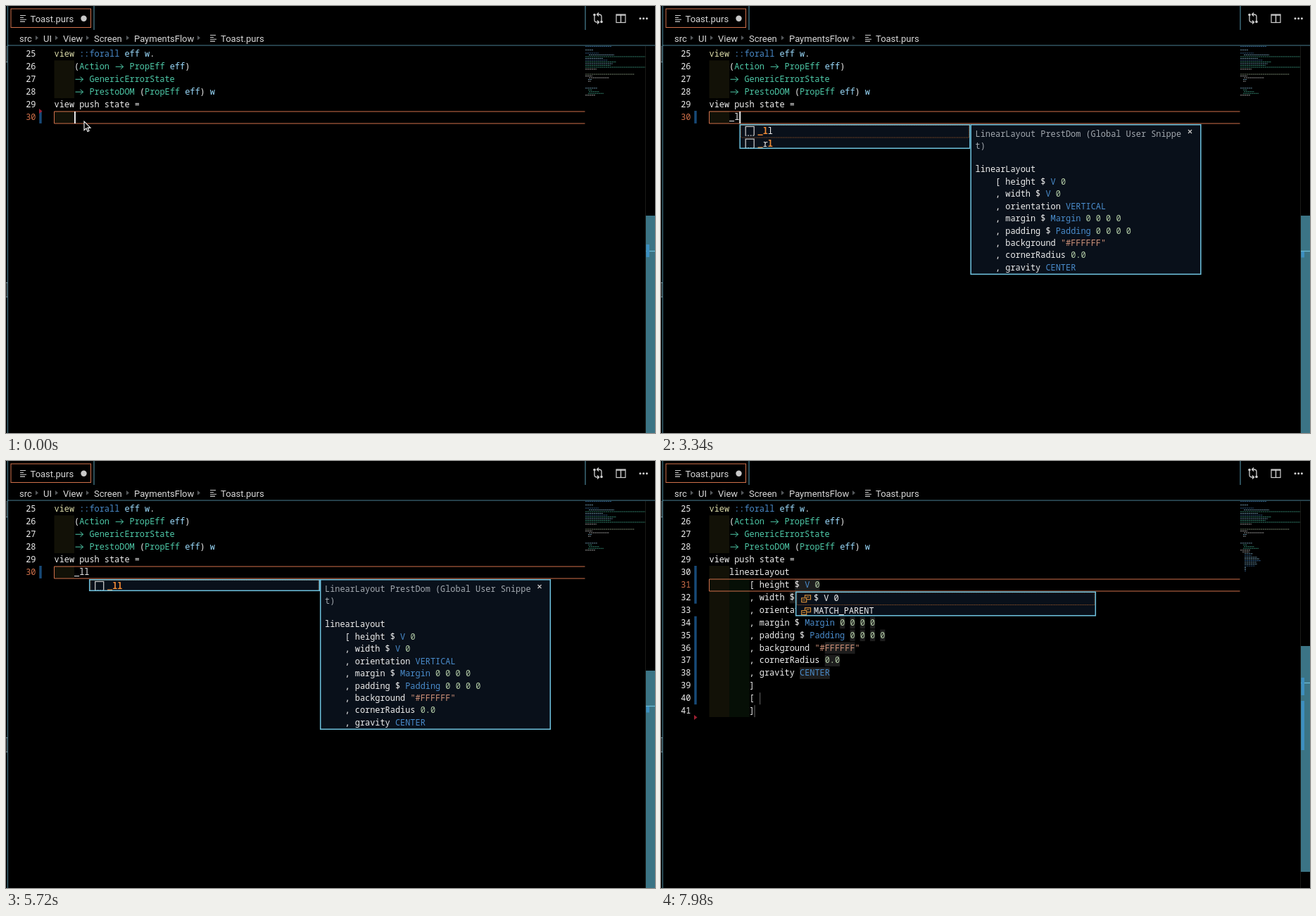
These frames come from a looping animation (922x607 px, 8 s). An HTML page:

```html
<!DOCTYPE html>
<html lang="en">
<head>
<meta charset="utf-8">
<title>Snippet completion</title>
<style>
  html, body { margin: 0; width: 100%; height: 100%; overflow: hidden; background: #000; }
  svg { display: block; width: 922px; height: 607px; }
  text { white-space: pre; font: 13px Roboto, sans-serif; fill: #d8d8d8; }
  .code { font: 11.9px "Noto Sans Mono", monospace; fill: #f0f0f0; }
  .bold { font-weight: 700; }
</style>
</head>
<body>
<svg id="stage" viewBox="0 0 922 607"></svg>
<script>
const LOOP = 8000, CHAR = 7.14, LEFT = 68.5;
const TYPE1 = 2000, POPUP = 2060, DIFF = 2300, TYPE2 = 3340, TYPE3 = 4060,
      INSERT = 5740, CHOICE = 5800, DIFF2 = 6200;
const CYAN = '#6fc3df', ORANGE = '#d0704a', PANEL = '#09101a';
const COLORS = { w: '#f0f0f0', y: '#dcdcaa', b: '#4a8ccc', t: '#4ec9a8', v: '#9cdcfe',
                 n: '#b5cea8', s: '#ce9178', g: '#a3a9b0', o: '#f08a35' };

const mid = line => 68.4 + (line - 25) * 17.92;
const col = n => LEFT + n * CHAR;
const rect = (x, y, w, h, fill, extra = '') =>
  `<rect x="${x}" y="${y}" width="${w}" height="${h}" fill="${fill}" ${extra}/>`;
const frame = (x, y, w, h, color, width = 1, extra = '') =>
  rect(x, y, w, h, 'none', `stroke="${color}" stroke-width="${width}" ${extra}`);
const path = (d, color, width = 1, extra = '') =>
  `<path d="${d}" fill="none" stroke="${color}" stroke-width="${width}" ${extra}/>`;
const label = (x, y, s) => `<text x="${x}" y="${y}">${s}</text>`;

// Segments are split by "|"; the first letter of each is its color, ">" is an arrow.
function code(x, y, markup) {
  let at = x, out = '';
  for (const part of markup.split('|')) {
    const key = part[0], s = part.slice(1);
    if (key === '>') {
      out += path(`M${at + 1.5} ${y}h11m-4 -3.5l4 3.5l-4 3.5`, COLORS.t);
      at += 2 * CHAR;
      continue;
    }
    out += `<text class="code${key === 'o' ? ' bold' : ''}" x="${at}" y="${y + 4}" style="fill:${COLORS[key]}">${s}</text>`;
    at += s.length * CHAR;
  }
  return out;
}

const number = (n, active) =>
  `<text class="code" x="42.5" y="${mid(n) + 4}" text-anchor="end" ${active ? `style="fill:${ORANGE}"` : ''}>${n}</text>`;
const currentLine = n =>
  path(`M822.5 ${Math.round(mid(n) - 8)}H${LEFT}v17H822.5`, ORANGE, 1);
const indent = (from, to, c, fill) =>
  rect(col(c), mid(from) - 9, 4 * CHAR, (to - from + 1) * 17.92, fill);
const gutter = (from, to) =>
  rect(47.3, mid(from) - 9, 3.4, (to - from + 1) * 17.92, '#174a78');
const deleted = y => `<path d="M47 ${y}l4.5 3.5l-4.5 3.5z" fill="#9c2032"/>`;
const fileIcon = (x, y) => path(`M${x} ${y - 4}h8M${x} ${y - 1}h5M${x} ${y + 1.7}h9M${x} ${y + 4.6}h7`, '#cfcfcf', 1.1);

const SNIPPET = [
  'wlinearLayout',
  'w    [ height $ |bV |n0',
  'w    , width $ |bV |n0',
  'w    , orientation |bVERTICAL',
  'w    , margin $ |bMargin |n0 0 0 0',
  'w    , padding $ |bPadding |n0 0 0 0',
  'w    , background |s"#FFFFFF"',
  'w    , cornerRadius |n0.0',
  'w    , gravity |bCENTER'
];

function chrome() {
  const crumbs = [['src', 19], ['UI', 53], ['View', 81], ['Screen', 125], ['PaymentsFlow', 182], ['Toast.purs', 305]];
  const chevrons = [42, 70, 114, 171, 272];
  let out = frame(7, 4, 113.5, 26.5, ORANGE) + fileIcon(20, 17.5) + label(34.5, 22.5, 'Toast.purs');
  out += '<circle cx="110.5" cy="17.8" r="4.2" fill="#c9c9c9"/>';
  for (const [s, x] of crumbs) out += label(x, 50.5, s);
  for (const x of chevrons) out += `<path d="M${x} 42l4 3.3l-4 3.3z" fill="#55595c"/>`;
  out += fileIcon(290, 45.5);
  out += path('M2.5 0V607M2 56H922', CYAN, 1, 'opacity=".65"');
  out += path('M125 0V34M823 0V34', CYAN, 1, 'opacity=".8"');
  out += path('M1 57V79M1 393V413', '#b5c5ca', 1, 'stroke-dasharray="1 1"');
  out += path('M0 79.5H2M0 393.5H2M0 413.5H2', '#8fa5ad');
  // editor actions
  out += path('M836 14v6q0 3 4 3h2m-2 -2.5l2.5 2.5l-2.5 2.5M846 21v-6q0 -3 -4 -3h-2m2 -2.5l-2.5 2.5l2.5 2.5', '#d0d0d0', 1.3);
  out += '<circle cx="836" cy="12.5" r="1.8" fill="#d0d0d0"/><circle cx="846" cy="22.5" r="1.8" fill="#d0d0d0"/>';
  out += frame(867, 12, 13, 11.5, '#d0d0d0', 1.2) + path('M867 13H880M873.5 12v11', '#d0d0d0', 1.4);
  for (const x of [901, 905.7, 910.4]) out += `<circle cx="${x}" cy="17.7" r="1.5" fill="#d0d0d0"/>`;
  return out;
}

function miniRows(rows) {
  return rows.map(([y, x, end, key]) =>
    path(`M${x} ${y}H${end}`, COLORS[key], 1.1, 'stroke-dasharray="2.3 .6" opacity=".6"')).join('');
}

const minimap = miniRows([
  [57.5, 823, 860, 'b'], [62.5, 823, 834, 'v'], [67, 823, 842, 'b'], [69.5, 828, 864, 'v'],
  [72, 823, 909, 't'], [74.5, 823, 848, 'v'], [77, 823, 855, 'b'], [79.5, 823, 867, 't'],
  [82, 823, 862, 'v'], [84.5, 823, 859, 't'], [87, 823, 909, 't'], [89.8, 823, 839, 'w'],
  [97, 823, 893, 'n'], [99.5, 823, 833, 'w'], [102, 828, 857, 'w'], [104.5, 827, 832, 'v'],
  [107, 827, 831, 'w'], [116.8, 823, 840, 'v'], [119.3, 827, 833, 't'], [121.8, 828, 843, 't'],
  [124.3, 827, 849, 't'], [126.8, 823, 837, 'w']
]);

function baseCode() {
  const lines = ['yview |b::forall|v eff w|w.', 'w    (|tAction |>|t PropEff |veff|w)',
    'w    |>|t GenericErrorState', 'w    |>|t PrestoDOM |w(|tPropEff |veff|w) |vw', 'wview push state ='];
  return indent(26, 28, 0, '#121107') +
    lines.map((s, i) => number(25 + i) + code(LEFT, mid(25 + i), s)).join('');
}

const typedLine = s => code(col(4), mid(30), 'w' + s);

const ruler = (top, bottom, line) =>
  rect(909, top, 13, bottom - top, '#3b7485') + path(`M909 ${line}H922`, '#6cbcd8', 1.3);
const mark = (y, h) => rect(909.5, y, 4.5, h, '#3d8fc0');

function inserted() {
  const holes = [[31, 17, 5], [32, 16, 5], [36, 23, 6], [37, 23, 3], [38, 18, 6]];
  for (let i = 0; i < 4; i++) holes.push([34, 26 + 2 * i, 1], [35, 28 + 2 * i, 1]);
  let out = indent(30, 41, 0, '#121107') + indent(31, 41, 4, '#060f06');
  for (const [n, c, len] of holes) out += rect(col(c), mid(n) - 8, len * CHAR, 16.5, '#1d1d1d');
  out += currentLine(31);
  [...SNIPPET, 'w    ]', 'w    [', 'w    ]'].forEach((s, i) => {
    out += number(30 + i, i === 1) + code(col(4), mid(30 + i), s);
  });
  out += path(`M${col(10) + .8} ${mid(40) - 8}v17M${col(9) + .3} ${mid(41) - 8}v17`, '#666');
  out += miniRows([[129.3, 826, 836, 'w'], ...[841, 839, 847, 850, 852, 846, 847, 844, 831, 831, 831]
    .map((end, i) => [131.8 + i * 2.45, 829, end, i % 3 === 1 ? 'b' : 'v'])]);
  return out + ruler(263, 584, 315.5);
}

const ICONS = {
  snippet: (x, y) => path(`M${x + .7} ${y + 6}v-12.5h12v12.5`, '#c4c4c4', 1.3) +
    path(`M${x} ${y + 6.3}h14`, '#c4c4c4', 1.3, 'stroke-dasharray="2 1.6"'),
  word: (x, y) => frame(x + .5, y - 5.5, 13.5, 11.5, '#c4c4c4', 1.2) +
    `<text x="${x + 2}" y="${y + 3}" style="font-size:7.5px">abc</text>`,
  choice: (x, y) => frame(x + 5.5, y - 4.5, 8, 6, '#d08a38', 1.2) + rect(x, y - 1, 8, 7, PANEL) +
    frame(x + .7, y - .5, 7, 5.8, '#d08a38', 1.2) + path(`M${x + 7.5} ${y - 2}h4M${x + 2} ${y + 2.4}h4`, '#d08a38')
};

let clips = 0;
function panel(x, y, w, h, content) {
  const id = 'clip' + clips++;
  return `<clipPath id="${id}">${rect(x, y, w, h, '#fff')}</clipPath>` + rect(x, y, w, h, PANEL) +
    `<g clip-path="url(#${id})">${content}</g>` + frame(x + .7, y + .7, w - 1.4, h - 1.4, CYAN, 1.5);
}

function list(x, y, w, h, items) {
  const rows = items.map(([icon, s], i) => {
    const c = y + 9.8 + i * 17.9;
    return ICONS[icon](x + 8, c) + code(x + 26, c, s);
  });
  return panel(x, y, w, h, frame(x + 2, y + 1.5, w - 4, 17.5, '#8a5028', 1, 'stroke-dasharray="1 .7"') + rows.join(''));
}

function docs(x) {
  const lines = ['gLinearLayout PrestDom (Global User Snippe', 'gt)'];
  const out = lines.map((s, i) => code(x + 7, 182 + i * 17.3, s)).join('') +
    SNIPPET.map((s, i) => code(x + 7, 232.3 + i * 17.45, s)).join('') +
    path(`M${x + 309.5} 176l5 5m0 -5l-5 5`, '#c8c8c8', 1.2);
  return panel(x, 168, 328, 214, out);
}

const words = ['et', 'iv', 'll', 'mg', 'pd', 'rl', 'sh', 'tv'];
const pointer = '<path d="M111 164v12.5l3 -2.7l2 4.6l2 -.9l-2 -4.4h4z" fill="#000" stroke="#fff" stroke-width="1.1"/>';

// [start, end, markup]
const LAYERS = [
  [0, LOOP, chrome() + baseCode() + minimap + path('M908.5 57V607', '#1a1a16')],
  [0, INSERT, indent(30, 30, 0, '#121107') + currentLine(30) + number(30, true) + gutter(30, 30) + ruler(298, 607, 348.5)],
  [0, DIFF, deleted(146) + mark(339, 18)],
  [DIFF, INSERT, mark(349, 8.5)],
  [0, TYPE1, pointer],
  [TYPE1, TYPE2, typedLine('_')],
  [TYPE2, TYPE3, typedLine('_l')],
  [TYPE3, INSERT, typedLine('_ll')],
  [POPUP, TYPE2, list(104, 168, 427, 160, [['word', 'o_|werror'], ...words.map(s => ['snippet', 'o_|w' + s])])],
  [TYPE2, TYPE3, list(111.5, 168, 328, 35, [['snippet', 'o_l|wl'], ['snippet', 'o_|wr|ol']]) + docs(439.5)],
  [TYPE3, INSERT, list(118, 168, 328, 17, [['snippet', 'o_ll']]) + docs(446)],
  [INSERT, LOOP, inserted()],
  [INSERT, DIFF2, gutter(30, 30) + mark(308, 8)],
  [DIFF2, LOOP, gutter(30, 32) + gutter(34, 40) + deleted(361) + mark(308, 25) + mark(341, 70)],
  [CHOICE, LOOP, list(191, 185.5, 427, 35, [['choice', 'w$ V 0'], ['choice', 'wMATCH_PARENT']])]
];

// [time of the last caret move, column, line]
const CARETS = [[0, 4, 30], [TYPE1, 5, 30], [TYPE2, 6, 30], [TYPE3, 7, 30], [INSERT, 17, 31], [6300, 17, 31]];

const stage = document.getElementById('stage');
stage.innerHTML = LAYERS.map(layer => `<g>${layer[2]}</g>`).join('') + rect(0, 0, 1.8, 17, '#fff');
const groups = [...stage.children], caret = groups.pop();

function draw() {
  const t = performance.now() % LOOP;
  LAYERS.forEach(([start, end], i) => {
    groups[i].style.display = t >= start && t < end ? '' : 'none';
  });
  const [since, column, line] = CARETS.filter(c => c[0] <= t).pop();
  caret.setAttribute('x', col(column));
  caret.setAttribute('y', mid(line) - 8);
  caret.style.display = (t - since) % 1000 < 500 ? '' : 'none';
  requestAnimationFrame(draw);
}
draw();
</script>
</body>
</html>
```
